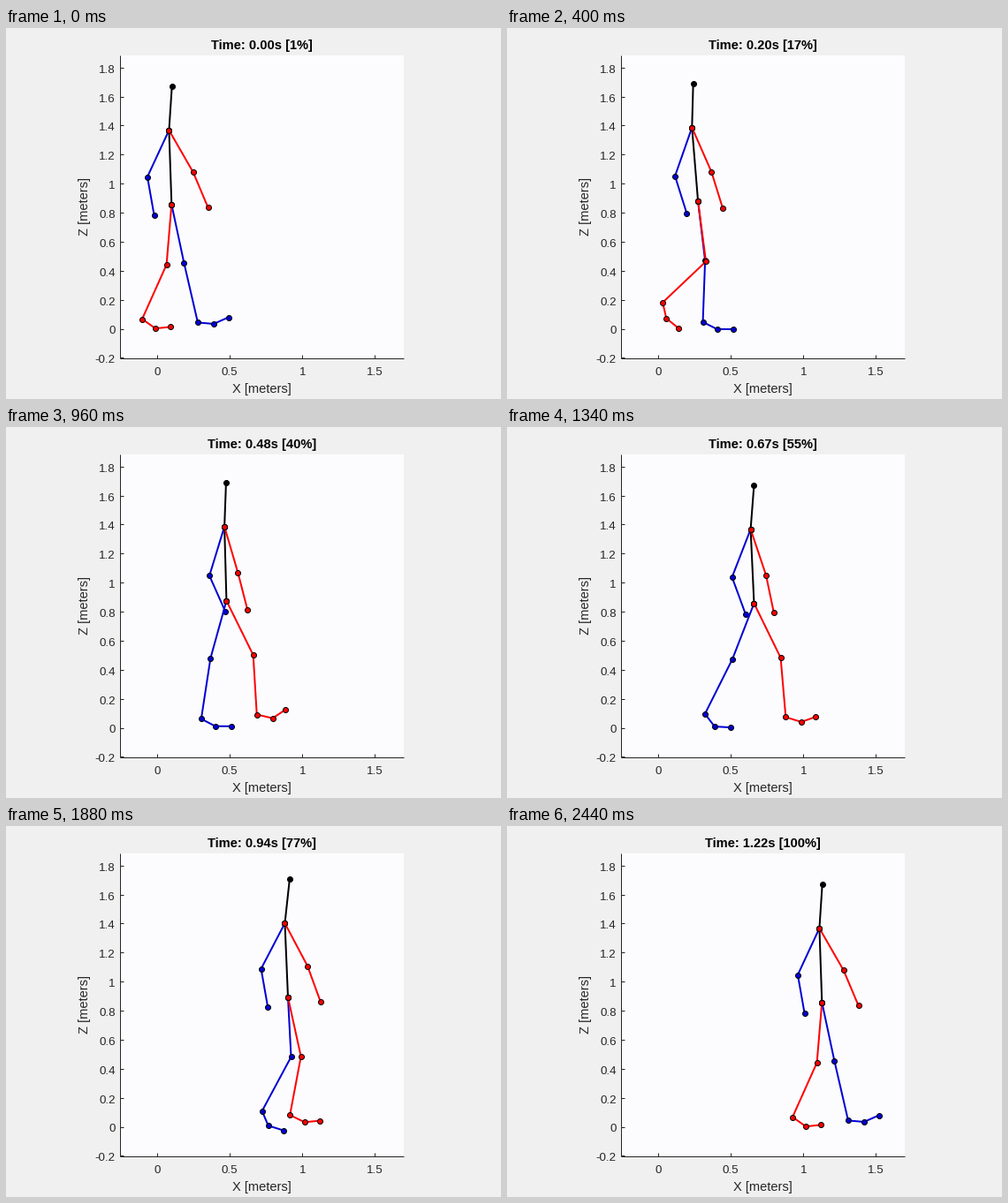
These frames come from a looping animation (560x420 px, 2460 ms). A matplotlib script:

```python
import numpy as np
import matplotlib.pyplot as plt
from matplotlib.animation import FuncAnimation
from matplotlib.patches import Rectangle

W, H, DPI = 560, 420, 100
FRAMES, STEP = 123, 20
CYCLE = 122                              # frames in one full stride
STRIDE = 169                             # pixels walked in one stride
PAPER, PLOT, INK = "#f0f0f0", "#fcfcfe", "#262626"
RED, BLUE, BLACK = "#ff0000", "#0000d4", "#000000"
LEFT, RIGHT, TOP, BOTTOM = 129.3, 450, 31, 373.7
X0, Z0, SCALE = 170.6, 340.6, 164.36     # pixel place of the origin, pixels per metre

frame = np.arange(FRAMES)

# One stride of a leg from heel strike: frame, then thigh, shank, foot and toe
# angles in degrees (0 points straight down, positive is forward)
POSES = np.array([
    (0, 12, 13, 85, 114),
    (8, 10, 8.5, 68, 99),
    (20, 6.8, -2.1, 63.4, 90),
    (48, -15.5, -8.7, 62.5, 90),
    (60, -20, -18, 56, 89),
    (67, -21.2, -26.6, 37.2, 86.8),
    (81, -8, -41.5, 12, 44),
    (94, 3, -28.2, 23, 72.6),
    (110, 11, 9.8, 78, 118),
])


def wave(mean, amp, peak, amp2=0, peak2=0):
    """Swing once per stride, plus an optional swing twice per stride."""
    w = 2 * np.pi / CYCLE
    return mean + amp * np.cos(w * (frame - peak)) + amp2 * np.cos(2 * w * (frame - peak2))


def cyclic(times, values, at):
    """Smooth periodic curve through the keys."""
    t = np.concatenate([times - CYCLE, times, times + CYCLE])
    v = np.tile(values, 3)
    slope = np.gradient(v, t)
    k = np.searchsorted(t, at, side="right") - 1
    h = t[k + 1] - t[k]
    u = (at - t[k]) / h
    return ((1 + 2 * u) * (1 - u) ** 2 * v[k] + u * (1 - u) ** 2 * h * slope[k]
            + u * u * (3 - 2 * u) * v[k + 1] + u * u * (u - 1) * h * slope[k + 1])


def chain(start, lengths, angles):
    """Joint paths of a limb, shaped (joint, axis, frame)."""
    points = [start]
    for length, angle in zip(lengths, angles):
        a = np.radians(angle)
        points.append(points[-1] + length * np.array([np.sin(a), np.cos(a)]))
    return np.array(points)


def leg(lengths, strike, offsets):
    phase = (frame - strike) % CYCLE
    angles = [cyclic(POSES[:, 0], POSES[:, i + 1], phase) + offset
              for i, offset in enumerate(offsets)]
    return chain(hip, lengths, angles)


hip = np.array([wave(186.9, 1.9, 105, 2.15, 19) + STRIDE * frame / CYCLE,
                wave(196.9, 0, 0, 2.9, 3)])
spine = chain(hip, (84, 50), (wave(182.65, 0.6, 30, 1.5, 20), wave(176.3, 2.5, 31)))
neck = spine[1]
LIMBS = [
    (spine, BLACK),
    (chain(neck, (58.2, 44.4), (wave(-22.2, 5.7, 40), wave(16, 8, 47))), BLUE),
    (leg((67.5, 69.5, 18, 18.2), 0, (0, 0, 0, 0)), BLUE),
    (chain(neck, (54.8, 43.4), (wave(23.5, 7.3, 112), wave(17.5, 5.5, 117, 2, 46))), RED),
    (leg((68.5, 67.5, 18.4, 17.4), CYCLE / 2, (15.5, -5, 1, 7)), RED),
]


def pt(px):
    return px * 72 / DPI


plt.rcParams["font.family"] = "Liberation Sans"
fig = plt.figure(figsize=(W / DPI, H / DPI), dpi=DPI, facecolor=PAPER)
ax = fig.add_axes([0, 0, 1, 1])
ax.set_xlim(0, W)
ax.set_ylim(H, 0)
ax.axis("off")


def rule(xs, ys):
    ax.plot(xs, ys, color=INK, lw=pt(1), solid_capstyle="butt", zorder=2)


def label(x, y, text, px, **style):
    style = {"ha": "center", "va": "baseline", "color": INK, **style}
    return ax.text(x, y, text, fontsize=pt(px), **style)


ax.add_patch(Rectangle((LEFT, TOP), RIGHT - LEFT, BOTTOM - TOP, fc=PLOT, ec="none", zorder=1))
rule([LEFT, LEFT], [TOP, BOTTOM])
rule([LEFT, RIGHT], [BOTTOM, BOTTOM])

for value in np.arange(0, 2, 0.5):
    x = X0 + SCALE * value
    rule([x, x], [BOTTOM, BOTTOM - 4])
    label(x + 0.4, 393, f"{value:g}", 13.33)
for value in np.arange(-1, 10) / 5:
    y = Z0 - SCALE * value
    rule([LEFT, LEFT + 4], [y, y])
    label(123.7, y + 5.9, f"{value:g}", 13.33, ha="right")

label(289.8, 413, "X [meters]", 14.67)
label(95.6, 202, "Z [meters]", 14.67, rotation=90, ha="right", va="center")
title = label(289.6, 24.4, "", 14.67, color=BLACK, weight="bold")

lines = []
for z, (_, color) in enumerate(LIMBS):
    line, = ax.plot([], [], color=color, lw=pt(2), marker="o", ms=pt(6),
                    mfc=color, mec=BLACK, mew=pt(1), zorder=3 + z)
    lines.append(line)


def draw(i):
    for line, (path, _) in zip(lines, LIMBS):
        line.set_data(path[:, 0, i], path[:, 1, i])
    percent = round(100 * (i + 1) / FRAMES)
    title.set_text(f"Time: {i / 100:.2f}s [{percent}%]")
    return [*lines, title]


anim = FuncAnimation(fig, draw, frames=FRAMES, interval=STEP, repeat=True, repeat_delay=0)
plt.show()
```
